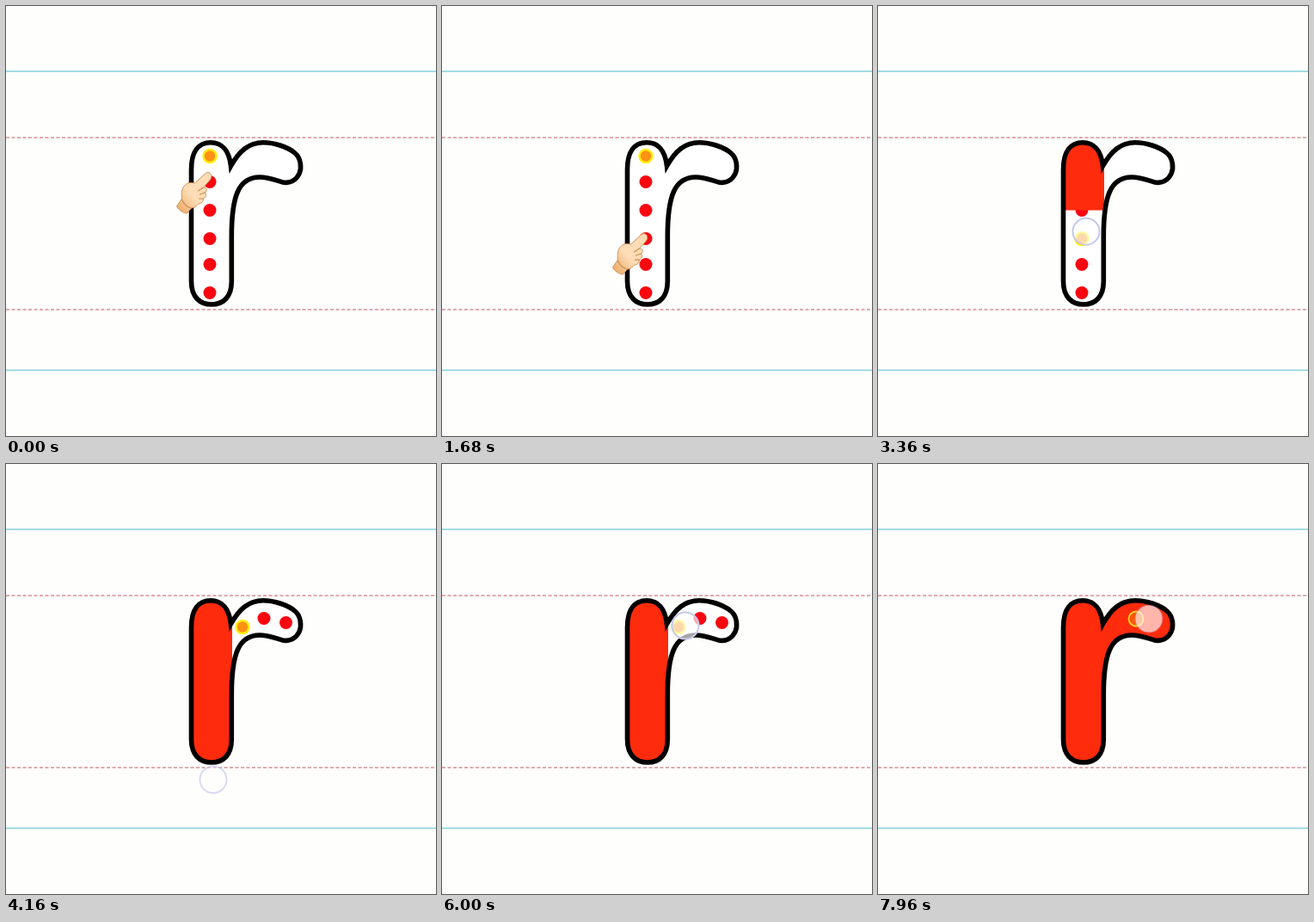
Write an HTML page that moves like this. It is 500 px wide and 500 px high and loops after 8000 ms.

```html
<!DOCTYPE html>
<html lang="en">
<head>
<meta charset="utf-8">
<title>Tracing the letter r</title>
<style>
html, body { margin: 0; width: 100%; height: 100%; overflow: hidden; background: #fefefc; }
svg { display: block; width: 100%; height: 100%; }
</style>
</head>
<body>
<svg viewBox="0 0 500 500">
  <defs>
    <path id="letter" d="M215.500 190C215.500 169 224 158.700 238 158.700C251 158.700 259.500 168 261.500 186C271 169 282 158.700 299 158.700
      C312 158.700 328 164 336 171C343 177 344 188 341 195C337 203 330 206.500 322 205C314 203 306 199 295 199
      C270 199 262.300 222 262.300 268V320C262.300 338 253 347 239 347C225 347 215.500 338 215.500 320Z"/>
    <clipPath id="inside"><use href="#letter"/></clipPath>
    <linearGradient id="skin" x1=".75" y1=".2" x2=".1" y2=".9">
      <stop offset=".5" stop-color="#fddcb6"/><stop offset="1" stop-color="#eeb070"/>
    </linearGradient>
  </defs>
  <path d="M0 76H500M0 423.500H500" stroke="#84cfdc" stroke-width="1.500"/>
  <path d="M0 153H500M0 353H500" stroke="#d58e96" stroke-width="1.300" stroke-dasharray="4 2.500"/>
  <use href="#letter" fill="#fff"/>
  <g id="dots"></g>
  <g clip-path="url(#inside)" fill="#ff2b0d">
    <rect id="stem" x="214" y="155" width="49"/>
    <rect id="arm" x="214" y="155" width="135" height="195"/>
  </g>
  <use href="#letter" fill="none" stroke="#000" stroke-width="5.600" stroke-miterlimit="8"/>
  <circle id="mark" cx="300" cy="180" r="8.500" fill="#ff8a10" fill-opacity=".45" stroke="#f6d21c" stroke-width="1.800"/>
  <circle id="ring" r="15.500" fill="#fff" fill-opacity=".65" stroke="#c5c7ec" stroke-width="2"/>
  <g id="hand" stroke="#c98a50" stroke-linecap="round" stroke-linejoin="round">
    <path d="M38 1C41 3 41 6 39 9L31 18C35 18 36 21 33 24C35 26 34 30 31 31C31 34 29 37 25 37
      C22 41 19 42 17 42L12 48C8 48 2 44 0 40L6 31C5 25 6 18 10 15C13 12 17 12 21 13L33 2C35 0 37 0 38 1Z"
      fill="url(#skin)" stroke-width=".9"/>
    <path d="M31 18L25 22M33 24L27 26M31 31L26 31M6 32C8 37 12 41 17 42" fill="none" stroke-width="1.100"/>
  </g>
</svg>
<script>
const $ = id => document.getElementById(id);
const stemY = [174.5, 204.5, 237.5, 270.5, 300.5, 333.5];
const armDots = [[275, 189.5], [300, 179.5], [325.5, 184.5]];
const LOOP = 8000, TOUCH = 2840, SWEEP = 7760;

// Linear interpolation through [time, value] points
function track(t, points) {
  let [t0, v0] = points[0];
  for (const [t1, v1] of points) {
    if (t < t1) return v0 + (v1 - v0) * Math.max(0, (t - t0) / (t1 - t0));
    [t0, v0] = [t1, v1];
  }
  return v0;
}

const dot = ([x, y], active) => active
  ? `<circle cx="${x}" cy="${y}" r="7.500" fill="#fd9216" stroke="#ffee08" stroke-width="2.500"/>`
  : `<circle cx="${x}" cy="${y}" r="7.500" fill="#f90610"/>`;

const show = (id, on) => $(id).setAttribute("visibility", on ? "visible" : "hidden");

function place(t) {
  if (t < 5000) return [track(t, [[2840, 238], [3360, 242], [4160, 241]]),
    track(t, [[2880, 175], [3360, 262], [3900, 352], [4160, 367], [4560, 375]])];
  return [track(t, [[5600, 281], [6000, 283], [SWEEP, 283], [7960, 315]]),
    track(t, [[SWEEP, 188], [7960, 180]])];
}

function draw(t) {
  const [x, y] = place(t);
  const stemDone = t > 5000 || t >= TOUCH && y >= 334 - 16;
  const armDone = t >= SWEEP + 80;

  // The next dot lights up as the finger nears it; the fill reaches the one before
  let next = 0;
  if (t >= TOUCH && !stemDone) {
    stemY.forEach((d, i) => { if (y >= d - 16) next = i; });
  }
  $("dots").innerHTML = stemDone
    ? armDots.map((p, i) => dot(p, i === 0)).join("")
    : stemY.map((d, i) => dot([237, d], i === next)).join("");
  $("stem").setAttribute("height", stemDone ? 195 : next ? stemY[next - 1] - 155 : 0);
  show("arm", armDone);
  show("mark", armDone);

  show("hand", t < TOUCH);
  const top = track(t, [[0, 193], [1000, 231], [2400, 299], [TOUCH, 320]]);
  $("hand").setAttribute("transform", `translate(198.500 ${top})`);

  $("ring").setAttribute("cx", x);
  $("ring").setAttribute("cy", y);
  $("ring").setAttribute("stroke-opacity", armDone ? 0.3 : 1);
  $("ring").setAttribute("opacity",
    track(t, [[2840, 0], [2920, 1], [3960, 1], [4160, .65], [4600, 0], [5480, 0], [5640, 1]]));
}

function frame(now) {
  draw(now % LOOP);
  requestAnimationFrame(frame);
}
requestAnimationFrame(frame);
</script>
</body>
</html>
```
